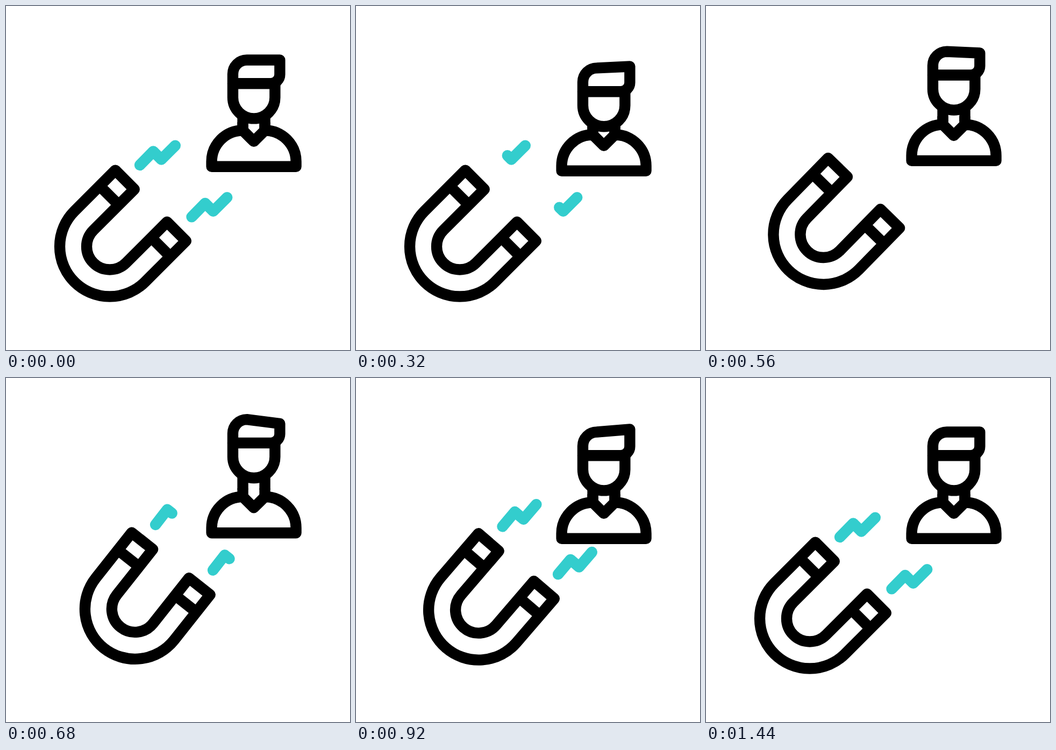
Animation of 640x640 px, one loop 1.56 s. Source, as an HTML page:

```html
<!DOCTYPE html>
<html lang="en">
<head>
<meta charset="utf-8">
<title>Magnet and person</title>
<style>
  html, body { margin: 0; width: 100%; height: 100%; overflow: hidden; background: #fff; }
  svg { display: block; width: 100%; height: 100%; }
  path { fill: none; stroke-width: 20.4; stroke-linejoin: round; }
  .ink { stroke: #000; }
  .bolt { stroke: #33cdcd; stroke-linecap: round; }
</style>
</head>
<body>
<svg viewBox="0 0 640 640">
  <g id="pull">
    <g class="ink" transform="translate(193 447.5) rotate(45)">
      <path d="M-93-107.7V0A93 93 0 0 0 93 0V-107.7H43V0A43 43 0 0 1-43 0V-107.7Z"/>
      <path d="M-93-66.5h50M43-66.5h50"/>
    </g>
    <g class="bolt">
      <path id="bolt" pathLength="1" d="M249 296l25-25.5 15 15 25.8-25.8"/>
      <use href="#bolt" x="96.5" y="96.4"/>
    </g>
  </g>
  <g id="body" class="ink">
    <path d="M382.6 298.8v-9.3a58 58 0 0 1 58-58l20.4 20.4 20.6-20.4a58 58 0 0 1 58 58v9.3z"/>
    <path d="M440.6 216v15m41 0v-15"/>
  </g>
  <g id="head" class="ink">
    <path d="M422 144v26.2a39.2 39.2 0 0 0 78.4 0V144"/>
    <path d="M440.6 203v28m41 0v-28"/>
    <path id="hair"/>
  </g>
</svg>
<script>
const LOOP = 1560, STEP = 40;   // poses are held at 25 fps

const [pull, bolt, body, head, hair] =
  ['pull', 'bolt', 'body', 'head', 'hair'].map(id => document.getElementById(id));

function draw(now) {
  // eased 0 to 1 between two times
  const ease = (from, to) => {
    const s = Math.min(1, Math.max(0, (now - from) / (to - from)));
    return s * s * (3 - 2 * s);
  };
  const lift = (el, y) => el.setAttribute('transform', `translate(0 ${y})`);

  // the magnet lunges toward the person, tilting back before each move
  const slide = 31.4 * (ease(396, 636) - ease(804, 1208));
  const turn = 2.6 * ease(380, 480) - 9.2 * ease(480, 680)
             + 9.4 * ease(840, 1090) - 2.8 * ease(1090, 1360);
  pull.setAttribute('transform', `translate(${slide} ${-slide}) rotate(${turn} 320 320)`);

  // the person crouches, stretches up and settles, head after body
  lift(body, 8 * ease(40, 320) - 19 * ease(330, 570) + 11 * ease(650, 890));
  lift(head, 15.8 * ease(60, 364) - 40.3 * ease(364, 644) + 24.5 * ease(645, 920));

  // the quiff swings against the head
  const tip = -3.5 * ease(60, 420) + 11.3 * ease(420, 680) - 12.8 * ease(680, 920)
            + 7 * ease(920, 1140) - 2 * ease(1140, 1440);
  hair.setAttribute('d', `M422 144.3v-17.8a26 26 0 0 1 26-26L509.4 ${100.5 + tip}` +
                         'V127.3a17 17 0 0 1-17 17z');

  // bolts run out at the far end, then grow again
  const gone = ease(200, 440);
  const from = gone < 1 ? gone : 0;
  const to = gone < 1 ? 1 : ease(560, 800);
  bolt.setAttribute('stroke-dasharray', `${to - from} 2`);
  bolt.setAttribute('stroke-dashoffset', -from);
  bolt.setAttribute('visibility', to > from ? 'visible' : 'hidden');
}

const start = performance.now();
function tick() {
  const t = (performance.now() - start) % LOOP;
  draw(t - t % STEP);
  requestAnimationFrame(tick);
}
tick();
</script>
</body>
</html>
```
